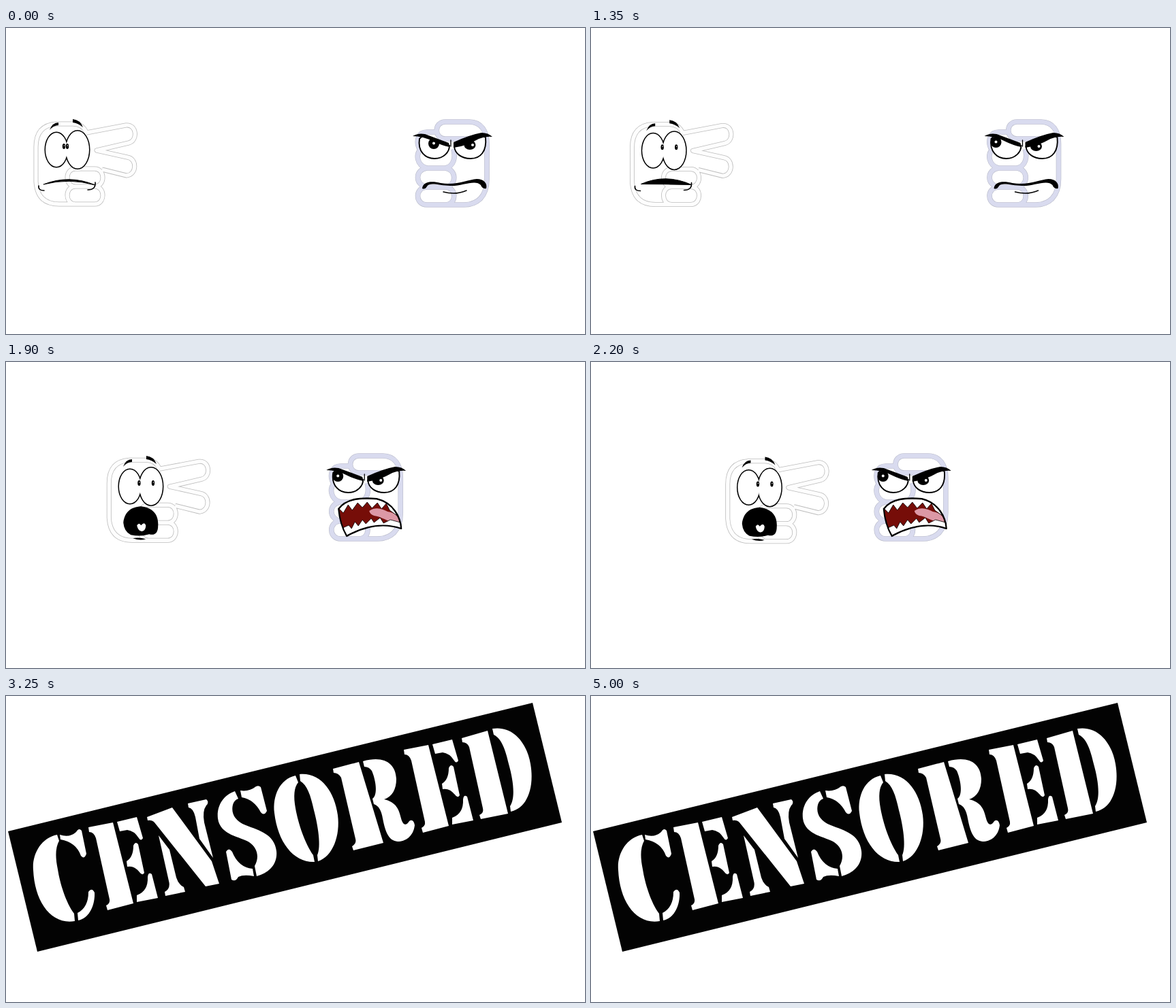
Animation, 850 px wide and 450 px high, one loop 5.05 s. Source, as an HTML page:

```html
<!DOCTYPE html>
<html lang="en">
<head>
<meta charset="utf-8">
<title>Hands</title>
<style>
  html, body { margin: 0; width: 100%; height: 100%; overflow: hidden; background: #fff; }
  svg { display: block; width: 850px; height: 450px; }
  .line { fill: none; stroke: #000; stroke-linecap: round; stroke-linejoin: round; }
  .band { fill: none; stroke-linejoin: round; }
</style>
</head>
<body>
<svg viewBox="0 0 850 450">
  <defs>
    <path id="scaredHand" d="M118 154Q113 141 98 141H74Q44 143 44 175V226Q46 259 78 259H132
      M118 154L176 143C192 141 194 166 180 169L133 180L178 190C193 192 192 216 177 217L141 208
      M102 207H130C146 207 146 233 130 233H102C86 233 86 207 102 207Z
      M102 233H130C146 233 146 259 130 259H102C86 259 86 233 102 233Z"/>
    <path id="angryHand" d="M700 163H645C628 163 628 138 645 138H680C698 138 706 152 706 170V222
      C706 248 692 260 672 260H618C600 260 600 234 618 234H645C662 234 662 260 645 260
      M618 234C600 231 600 208 618 206H645C662 208 662 232 645 234
      M618 206C602 202 602 184 608 180C600 165 606 153 618 153H632
      M645 206C658 203 660 190 657 178"/>
    <g id="letterE">
      <path d="M121 193L157 186 187 305 149 315 147 308Q153 305 152 299L132 209Q129 200 122 200Z"/>
      <path d="M163 185L192 178 201 209Q198 214 195 209 188 198 178 197L167 199Z"/>
      <path d="M177 243Q187 237 187 220 190 213 194 218L203 260Q200 265 196 259 188 249 178 251Z"/>
      <path d="M192 303L223 297 214 262Q209 258 208 266 209 287 192 293Z"/>
    </g>
  </defs>

  <g id="faces">
    <g id="scared">
      <use href="#scaredHand" class="band" stroke="#bcbcbc" stroke-width="7"/>
      <use href="#scaredHand" class="band" stroke="#fdfdfd" stroke-width="5.4"/>
      <g id="scaredFace">
        <g stroke="#000" stroke-width="3">
          <ellipse cx="74" cy="179" rx="16" ry="25"/>
          <ellipse cx="105" cy="179" rx="17" ry="27.5"/>
        </g>
        <g fill="#fff">
          <ellipse cx="74" cy="179" rx="16" ry="25"/>
          <ellipse cx="105" cy="179" rx="17" ry="27.5"/>
        </g>
        <g id="leftPupil"><ellipse rx="2.2" ry="4"/><circle cx=".4" cy="-1" r=".7" fill="#fff"/></g>
        <g id="rightPupil"><ellipse rx="2.2" ry="4"/><circle cx=".4" cy="-1" r=".7" fill="#fff"/></g>
        <path d="M64 150Q68 139 77 139L77 143Q70 143 64 150Z"/>
        <path d="M98 134Q109 135 113 146Q106 140 98 139Z"/>
      </g>
      <g id="scaredClosed">
        <path class="line" stroke-width="1.6" d="M48 232Q47 239 56 239M131 227Q132 238 120 238"/>
        <path id="frown" stroke="#000" stroke-width="1"/>
      </g>
      <g id="scaredOpen">
        <path d="M65 233C67 217 76 210 91 209C108 211 117 221 116 237C116 249 111 252 103 250Q90 254 76 251Q66 246 65 233Z"/>
        <path fill="#fff" d="M85 237Q88 232 91 237 96 231 98 237C98 248 87 249 85 237Z"/>
        <path d="M79 256Q88 254 98 257Q90 260 79 256Z"/>
      </g>
    </g>

    <g id="angry">
      <use href="#angryHand" class="band" stroke="#b9bbc9" stroke-width="7.6"/>
      <use href="#angryHand" class="band" stroke="#d9dbef" stroke-width="6.4"/>
      <g fill="#fff" stroke="#000" stroke-width="1.9">
        <path d="M607 163C604 182 616 192 629 192C643 192 651 182 651 173L612 158Z"/>
        <path d="M658 174C659 185 669 192 682 192C697 192 706 181 704 161L698 158Z"/>
      </g>
      <g id="leftIris"><circle r="8"/><circle cy="-.5" r="2" fill="#fff"/></g>
      <g id="rightIris"><ellipse rx="8.5" ry="7"/><circle cx="4" r="2" fill="#fff"/></g>
      <path d="M597 159Q605 154 615 156L650 169 651 175Q638 172 628 167 612 159 597 159Z"/>
      <path d="M657 168Q681 157 698 154 708 154 714 160 704 159 694 163 675 174 657 176Z"/>
      <path class="line" stroke-width="1.3" d="M653 165V174"/>
      <g id="angryClosed">
        <path d="M611 236C612 225 626 225 638 228C661 232 678 223 691 222C702 222 707 229 705 236
          Q699 237 697 231C689 222 669 233 652 232C637 232 622 226 618 233Q615 238 611 236Z"/>
        <path class="line" stroke-width="1.5" d="M642 241Q660 246 676 239"/>
      </g>
      <g id="angryOpen" transform="translate(127)">
        <path id="jaw" fill="#760d08" d="M488 216C499 201 519 199 544 201C569 207 579 229 580 245C552 235 523 243 500 256Q490 239 488 216Z"/>
        <path fill="#dc98a6" d="M533 219C543 212 552 216 560 220Q575 222 577 235C562 238 552 227 540 226Q534 224 533 219Z"/>
        <g fill="#fff" stroke="#000" stroke-width=".8">
          <path d="M489 216C499 202 519 200 544 202C561 206 570 217 574 226L563 218 558 208 551 216 545 207 537 215 530 206 523 214 516 207 508 218 502 210 495 222Z"/>
          <path d="M500 255L494 244 503 240 507 245 512 235 517 241 523 232 528 238 536 230 540 236 549 229 554 237 564 232 579 236 580 245C552 235 523 243 500 255Z"/>
        </g>
        <use href="#jaw" style="fill-opacity:0" class="line" stroke-width="2.2"/>
      </g>
    </g>
  </g>

  <g id="stamp" role="img" aria-label="CENSORED">
    <path fill="#030303" d="M3 199L773 10 816 186 46 376Z"/>
    <g fill="#fff">
      <!-- C -->
      <path d="M75 204C51 209 38 233 40 256C42 302 66 337 101 331L100 320C88 304 79 275 76 255Q70 227 78 213Z"/>
      <path d="M79 204Q93 209 103 200 107 193 111 198L118 232Q115 241 110 235 103 215 80 211Z"/>
      <path d="M105 319Q121 311 121 288 126 281 130 289C131 306 123 327 106 330Z"/>
      <use href="#letterE"/>
      <!-- N -->
      <path d="M207 178L244 164 302 243 313 276 293 280 218 186Q214 182 208 183Z"/>
      <path d="M267 158L294 152Q299 156 294 161 288 169 291 186L304 238 284 210 278 178Q275 165 268 164Z"/>
      <path d="M224 205L240 226 250 267Q253 277 261 281L263 288 234 294 233 288Q242 283 239 272Z"/>
      <!-- S -->
      <path d="M336 140C318 146 309 163 311 180C314 205 345 207 357 215C370 224 372 238 365 250L368 265C388 260 399 245 397 228C394 203 372 198 352 190C336 184 330 172 333 160Q335 153 341 151Z"/>
      <path d="M344 139Q357 141 367 133 371 131 374 134L383 169Q379 177 374 171 364 152 346 149Z"/>
      <path d="M323 229Q327 222 332 229 341 252 362 254L364 265Q349 262 341 266 337 274 331 270Z"/>
      <!-- O -->
      <path d="M425 117C402 122 391 147 394 172C399 215 422 245 453 244L451 234C439 217 429 188 425 165Q420 138 429 127Z"/>
      <path d="M431 115C462 112 482 140 487 175C491 205 480 236 458 243L457 234C463 222 458 190 452 168C447 145 442 131 432 125Z"/>
      <!-- R -->
      <path d="M480 107L518 97 554 216 510 227 508 221Q515 217 513 210L492 120Q488 113 481 113Z"/>
      <path d="M524 96C556 87 572 100 573 122C573 137 567 148 555 152C573 156 577 167 580 180C583 191 588 191 592 184Q598 180 600 190C598 207 586 214 575 214C560 213 556 195 553 180Q550 162 540 159L538 151C547 145 542 121 537 110Q533 104 526 104Z"/>
      <use href="#letterE" transform="translate(463 -114)"/>
      <!-- D -->
      <path d="M669 62L707 51 737 173 697 181 695 175Q702 172 700 165L680 75Q677 68 670 68Z"/>
      <path d="M714 48C745 43 765 70 770 100C776 135 765 165 741 170L740 162C748 150 745 125 738 100C733 78 727 62 716 57Z"/>
    </g>
  </g>
</svg>

<script>
const LOOP = 5050, STEP = 50;
const APPROACH = 1250, SHOUT = 1700, CENSOR = 2250;
const $ = id => document.getElementById(id);
const clamp = v => Math.max(0, Math.min(1, v));
const mix = (a, b, k) => a + (b - a) * k;
const show = (id, on) => $(id).style.display = on ? '' : 'none';
const move = (id, x, y) => $(id).setAttribute('transform', `translate(${x} ${y})`);

// Mouth poses: start x, corner y, upper and lower control y
const tense = [55, 230, 215, 220], flat = [59, 234, 229, 232], gape = [57, 229, 213, 229];

function frownPath(t) {
  const [a, b, k] = t < 950 ? [tense, flat, t / 950] : [flat, gape, clamp((t - 950) / 400)];
  const [x, y, top, low] = a.map((v, i) => mix(v, b[i], k));
  return `M${x} ${y}Q93 ${top} 131 ${y + 1}Q93 ${low} ${x} ${y}Z`;
}

function draw(t) {
  const censored = t >= CENSOR, shouting = t >= SHOUT;
  show('faces', !censored);
  show('stamp', censored);
  if (censored) return;

  const walk = Math.max(0, t - APPROACH);
  move('scared', walk * 0.165, walk * 0.005);
  move('angry', -walk * 0.195, 0);
  move('scaredFace', clamp(t / 950) * 0.7, clamp(t / 950) * 0.7);

  const glance = clamp((t - 1100) / 150);
  move('leftPupil', mix(85, 87.5, glance), 174);
  move('rightPupil', mix(90, 108, glance), 174);
  move('leftIris', mix(628, 614, glance), mix(170, 168, glance));
  move('rightIris', mix(681, 673, glance), mix(172, 174, glance));

  for (const who of ['scared', 'angry']) {
    show(who + 'Closed', !shouting);
    show(who + 'Open', shouting);
  }
  $('frown').setAttribute('d', frownPath(t));
}

function tick() {
  draw(Math.floor(performance.now() % LOOP / STEP) * STEP);
  requestAnimationFrame(tick);
}
tick();
</script>
</body>
</html>
```
